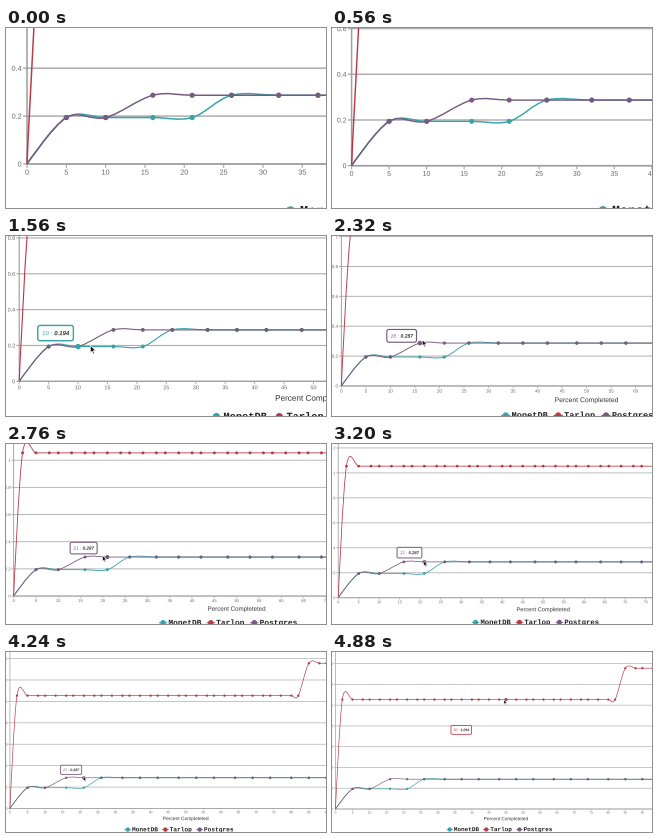
Recreate the animation shown at these times as a matplotlib script. Size 320 by 180 pixels, loop 4920 ms.

```python
import numpy as np
import matplotlib.pyplot as plt
from matplotlib.animation import FuncAnimation
from matplotlib.collections import LineCollection, PatchCollection
from matplotlib.patches import Circle, FancyBboxPatch, PathPatch, Polygon
from matplotlib.path import Path
from matplotlib.textpath import TextPath

W, H, DPI = 320, 180, 100
FRAMES, STEP = 123, 40
PT = 72 / DPI
UNIT = 30.45  # chart height of the value 1, measured in percent units

TEAL, RED, PURPLE = "#38a2a8", "#bb3846", "#785a80"
GRID, LABEL, INK = "#b0b0b0", "#666666", "#333333"

plt.rcParams["path.snap"] = False
fig = plt.figure(figsize=(W / DPI, H / DPI), dpi=DPI, facecolor="white")
ax = fig.add_axes([0, 0, 1, 1])
ax.axis("off")

scaled = []  # (artist, line width in chart units)


def stroke(artist, width):
    scaled.append((artist, width))
    return artist


def glyphs(text, x, y, size, align="left", family="Liberation Sans", **font):
    """Outline of a text with its baseline at y."""
    path = TextPath((0, 0), text, size=size * 20, prop=dict(family=family, **font))
    verts = path.vertices / 20
    box = path.get_extents()
    shift = {"left": 0, "center": (box.x0 + box.x1) / 40, "right": box.x1 / 20}[align]
    return Path(verts + [x - shift, y], path.codes)


def write(text, x, y, size, color, z=2, **opts):
    patch = PathPatch(glyphs(text, x, y, size, **opts), fc=color, lw=0, zorder=z)
    return ax.add_patch(patch)


def lines(segments, color, width, z):
    art = LineCollection(segments, colors=color, zorder=z)
    ax.add_collection(art, autolim=False)
    return stroke(art, width)


def spline(points):
    """Catmull-Rom curve through the points as cubic Beziers."""
    p = np.vstack([points[:1], points, points[-1:]])
    tangent = (p[2:] - p[:-2]) / 6
    verts, codes = [points[0]], [Path.MOVETO]
    for i in range(len(points) - 1):
        start = points[i] + (tangent[i] if i else 0)
        verts += [start, points[i + 1] - tangent[i + 1], points[i + 1]]
        codes += [Path.CURVE4] * 3
    return Path(verts, codes)


def series(xs, values, color, z):
    pts = np.column_stack([xs, np.array(values) * UNIT])
    curve = PathPatch(spline(pts), fc="none", ec=color, zorder=z)
    stroke(ax.add_patch(curve), 0.19)
    dots = [Circle(p, 0.33) for p in pts[1:]]
    ax.add_collection(PatchCollection(dots, fc=color, lw=0, zorder=z + 0.1),
                      autolim=False)


# grid, axes and labels
levels = np.arange(0, 1.61, 0.2)
lines([[(-0.5, v * UNIT), (100, v * UNIT)] for v in levels], GRID, 0.2, 1)
lines([[(0, 0), (0, 1.6 * UNIT)], [(0, 0), (100, 0)]], "#a0a0a0", 0.2, 1.1)
lines([[(x, 0), (x, -0.5)] for x in range(0, 101, 5)], GRID, 0.16, 1)
for v in levels:
    write(f"{v:.1f}".replace(".0", ""), -0.72, v * UNIT - 0.33, 0.92, LABEL,
          align="right")
for x in range(0, 101, 5):
    write(str(x), x, -1.35, 0.92, LABEL, align="center")
write("Percent Completeted", 50, -3.3, 1.385, INK, align="center")

# data
fine = np.arange(38) * 8 // 3
coarse = np.arange(19) * 16 // 3
series(coarse, np.select([coarse == 0, coarse < 26], [0, 0.194], 0.287), TEAL, 3)
series(fine, np.select([fine == 0, fine < 85], [0, 1.054], 1.356), RED, 4)
series(coarse, np.select([coarse == 0, coarse < 16], [0, 0.194], 0.287), PURPLE, 5)

# legend
for x, name, color in [(33.5, "MonetDB", TEAL), (44.2, "Tarlop", RED),
                       (53.95, "Postgres", PURPLE)]:
    lines([[(x - 0.95, -6), (x + 0.95, -6)]], color, 0.22, 2)
    ax.add_patch(Circle((x, -6), 0.62, fc=color, lw=0, zorder=2))
    write(name, x + 1.2, -6.5, 1.76, "#222222", family="Liberation Mono",
          weight="bold")

# hovered point, tooltip and pointer
TIP_W, TIP_H = 6.05, 2.6
hover = ax.add_patch(Circle((0, 0), 0.46, lw=0, zorder=6))
box = FancyBboxPatch((0, 0), TIP_W, TIP_H, fc=(1, 1, 1, 0.92), zorder=7,
                     boxstyle="round,pad=0,rounding_size=0.4")
stroke(ax.add_patch(box), 0.24)
tip_x = write("0", 0, 0, 1, INK, z=8)
tip_y = write("0", 0, 0, 1, INK, z=8)

ARROW = np.array([(0, 0), (0, -1.25), (0.28, -0.98), (0.48, -1.45),
                  (0.68, -1.36), (0.48, -0.9), (0.9, -0.9)])
pointer = Polygon(ARROW, fc="#111111", ec="white", zorder=9)
stroke(ax.add_patch(pointer), 0.1)

# start time, x, value, colour
HOVERS = [(1240, 10, 0.194, TEAL), (2000, 16, 0.287, PURPLE),
          (2640, 21, 0.287, PURPLE), (4680, 50, 1.054, RED)]
# time, right edge, centre height
TIP_KEYS = np.array([(1240, 9.2, 8.2), (1960, 9.2, 8.2), (2200, 15.3, 10.2),
                     (2600, 15.35, 10.25), (2840, 20.4, 11), (4640, 20.4, 11),
                     (4880, 39.9, 23.2)])
# time, tip of the arrow
POINTER_KEYS = np.array([(0, 7.6, -5.9), (600, 7.6, -5.9), (1000, 7.45, 5.4),
                         (1560, 12.1, 6.1), (2320, 16.5, 9.4),
                         (2880, 20.9, 8.95), (4440, 20.9, 9.1),
                         (4840, 49.4, 32)])
# time, pixels per percent
ZOOM_KEYS = np.array([(0, 7.865), (1000, 6.87), (1560, 5.885), (2320, 4.905),
                      (3200, 4.1), (4240, 3.517), (4880, 3.41)])
ZOOM_T, ZOOM_W = ZOOM_KEYS[:, 0], 1 / ZOOM_KEYS[:, 1]
ZOOM_D = np.gradient(ZOOM_W, ZOOM_T)
ZOOM_D[[0, -1]] = 0


def track(t, keys):
    return [np.interp(t, keys[:, 0], col) for col in keys.T[1:]]


def zoom(t):
    """Pixels per percent; the visible width follows a smooth Hermite curve."""
    i = min(np.searchsorted(ZOOM_T, t, side="right") - 1, len(ZOOM_T) - 2)
    span = ZOOM_T[i + 1] - ZOOM_T[i]
    u = (t - ZOOM_T[i]) / span
    ease = u * u * (3 - 2 * u)
    width = (ZOOM_W[i] * (1 - ease) + ZOOM_W[i + 1] * ease
             + span * u * (1 - u) * (ZOOM_D[i] * (1 - u) - ZOOM_D[i + 1] * u))
    return 1 / width


def show_tooltip(t):
    active = [h for h in HOVERS if h[0] <= t]
    for art in (hover, box, tip_x, tip_y):
        art.set_visible(bool(active))
    if not active:
        return
    _, x, value, color = active[-1]
    hover.set_center((x, value * UNIT))
    hover.set_facecolor(color)
    right, mid = track(t, TIP_KEYS)
    left = right - TIP_W
    box.set_x(left)
    box.set_y(mid - TIP_H / 2)
    box.set_edgecolor(color)
    tip_x.set_path(glyphs(f"{x} :", left + 0.75, mid - 0.36, 1.02, style="italic"))
    tip_x.set_facecolor(color)
    tip_y.set_path(glyphs(f"{value:.3f}", left + 2.8, mid - 0.36, 1.02,
                          style="italic", weight="bold"))


def update(i):
    t = i * STEP
    s = zoom(t)
    x0, y0 = 3.93 * s - 9.9, 173.07 - 4.714 * s
    ax.set_xlim(-x0 / s, (W - x0) / s)
    ax.set_ylim((y0 - H) / s, y0 / s)
    for art, width in scaled:
        art.set_linewidth(width * s * PT)
    show_tooltip(t)
    pointer.set_xy(ARROW + track(t, POINTER_KEYS))
    return []


anim = FuncAnimation(fig, update, frames=FRAMES, interval=STEP, repeat=True,
                     repeat_delay=0, blit=False)
plt.show()
```
